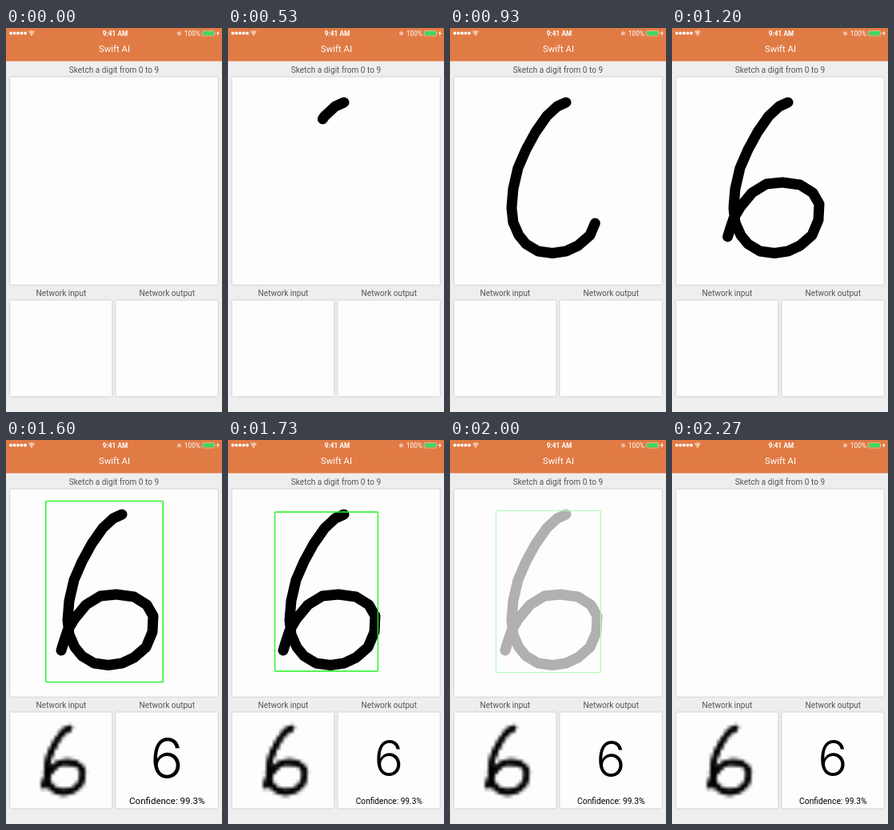
An HTML page with a canvas that plays this animation: 270x480 px, repeating every 2390 ms.

```html
<!DOCTYPE html>
<html lang="en">
<head>
<meta charset="utf-8">
<style>
  html, body { margin: 0; width: 100%; height: 100%; overflow: hidden; background: #eee; }
  svg, canvas { position: absolute; display: block; }
  svg { left: 0; top: 0; width: 270px; height: 480px; }
  canvas { left: 9px; top: 340px; width: 120px; height: 120px; }
  text { font-family: Roboto, sans-serif; text-anchor: middle; }
  .label { font-size: 10.1px; fill: #555; }
  .status { font-size: 8.3px; fill: #fff; }
  .card { fill: #fdfdfd; filter: drop-shadow(0 .7px 1px rgba(0, 0, 0, .25)); }
</style>
</head>
<body>
<svg viewBox="0 0 270 480">
  <rect width="270" height="480" fill="#eee"/>
  <rect width="270" height="41.5" fill="#e17b45"/>

  <g fill="#fff">
    <circle cx="6" cy="6.5" r="1.9"/><circle cx="10.5" cy="6.5" r="1.9"/><circle cx="15" cy="6.5" r="1.9"/>
    <circle cx="19.5" cy="6.5" r="1.9"/><circle cx="24" cy="6.5" r="1.9"/>
    <path d="M30.6 8.2Q32 7 33.4 8.2L32 9.8Z"/>
    <path d="M28.4 5.2Q32 2.2 35.6 5.2M29.6 6.9Q32 4.9 34.4 6.9" fill="none" stroke="#fff" stroke-width="1.1"/>
    <circle cx="216.5" cy="6.7" r="2.5" opacity=".5"/>
    <path d="M265.6 3l-2.6 4h1.7l-.7 3.2 2.8-4.2h-1.7z"/>
    <path d="M261.3 5.3q1.2 1.2 0 2.6z"/>
  </g>
  <rect x="245.3" y="3.4" width="15.2" height="6.6" rx="1.3" fill="none" stroke="#f6d5c4" stroke-width=".6"/>
  <rect x="246" y="4.1" width="13.8" height="5.2" rx=".7" fill="#41d85f"/>
  <text class="status" x="136.5" y="9.7" font-weight="600">9:41 AM</text>
  <text class="status" x="233" y="9.7">100%</text>
  <text x="135.5" y="30" font-size="11.4" fill="#fff">Swift AI</text>

  <text class="label" x="135" y="55.7">Sketch a digit from 0 to 9</text>
  <text class="label" x="69" y="335">Network input</text>
  <text class="label" x="201.3" y="335">Network output</text>
  <rect class="card" x="5.3" y="61.5" width="259.5" height="259.2" rx="1.2"/>
  <rect class="card" x="5.3" y="340.5" width="127" height="119.7" rx="1.2"/>
  <rect class="card" x="137.4" y="340.5" width="127.4" height="119.7" rx="1.2"/>

  <g id="sketch">
    <polyline id="stroke" fill="none" stroke="#000" stroke-width="13" stroke-linecap="round" stroke-linejoin="round"/>
    <rect id="bounds" x="57.6" y="88.5" width="130.8" height="202" rx="1" fill="none" stroke="#1cf51c" stroke-width="1.3"/>
  </g>
  <g id="output">
    <text id="digit" x="201" y="420.5" font-size="62" style="font-family: Inter, sans-serif; font-weight: 300">6</text>
    <text id="confidence" x="201.3" y="454.7" font-size="10.3">Confidence: 99.3%</text>
  </g>
</svg>
<canvas id="input" width="28" height="28"></canvas>

<script>
const LOOP = 2390, RECOGNIZED = 1600, FADE_START = 1835, FADE_END = 2070;
const $ = id => document.getElementById(id);

const points = [
  [145, 93], [134, 98], [121, 110], [107, 130], [95, 152], [85, 175], [79, 201],
  [77, 225], [79, 243], [86, 259], [95, 270], [110, 279], [128, 281.5],
  [145, 279], [160, 272], [175, 259], [183, 240], [184, 220], [176, 206], [160, 196],
  [138, 193], [118, 195], [100, 206], [86, 223], [77, 238], [73, 250], [69, 263]
];
$("stroke").setAttribute("points", points.join(" "));
const strokeLength = $("stroke").getTotalLength();

// The sketch reduced to the 28 x 28 network input
const ctx = $("input").getContext("2d");
ctx.translate(14.6, 14);
ctx.scale(.099, .099);
ctx.translate(-126.5, -187);
ctx.lineWidth = 16;
ctx.lineCap = ctx.lineJoin = "round";
ctx.beginPath();
points.forEach(p => ctx.lineTo(...p));
ctx.stroke();
ctx.stroke();

function show(el, visible) {
  el.style.visibility = visible ? "visible" : "hidden";
}

function scaleAbout(id, x, y, s) {
  $(id).setAttribute("transform", `translate(${x} ${y}) scale(${s}) translate(${-x} ${-y})`);
}

// Snap to the 15 fps clock, whose ticks fall on whole hundredths of a second
function snap(time) {
  const tick = n => Math.round(n * 20 / 3) * 10;
  const n = Math.floor(time * 3 / 200) + 1;
  return tick(n) <= time ? tick(n) : tick(n - 1);
}

function render(now) {
  const t = snap(now % LOOP);
  const drawn = Math.min(strokeLength + 1, 131 + .69 * (t - 670));
  show($("stroke"), drawn > 0);
  $("stroke").setAttribute("stroke-dasharray", `${Math.max(drawn, 0)} 9999`);

  const since = t - RECOGNIZED, recognized = since >= 0;
  for (const id of ["bounds", "output", "input"]) show($(id), recognized);
  if (recognized) {
    const spring = 1 + .12 * Math.exp(-.0113 * since) * Math.cos(.0165 * since);
    scaleAbout("bounds", 123, 189.5, spring);
    scaleAbout("digit", 201, 398, spring);
    scaleAbout("confidence", 201.3, 451, spring);
  }
  const fade = (FADE_END - t) / (FADE_END - FADE_START);
  $("sketch").setAttribute("opacity", Math.min(1, Math.max(0, fade)));
}

const start = performance.now();
function loop() {
  render(performance.now() - start);
  requestAnimationFrame(loop);
}
loop();
</script>
</body>
</html>
```
